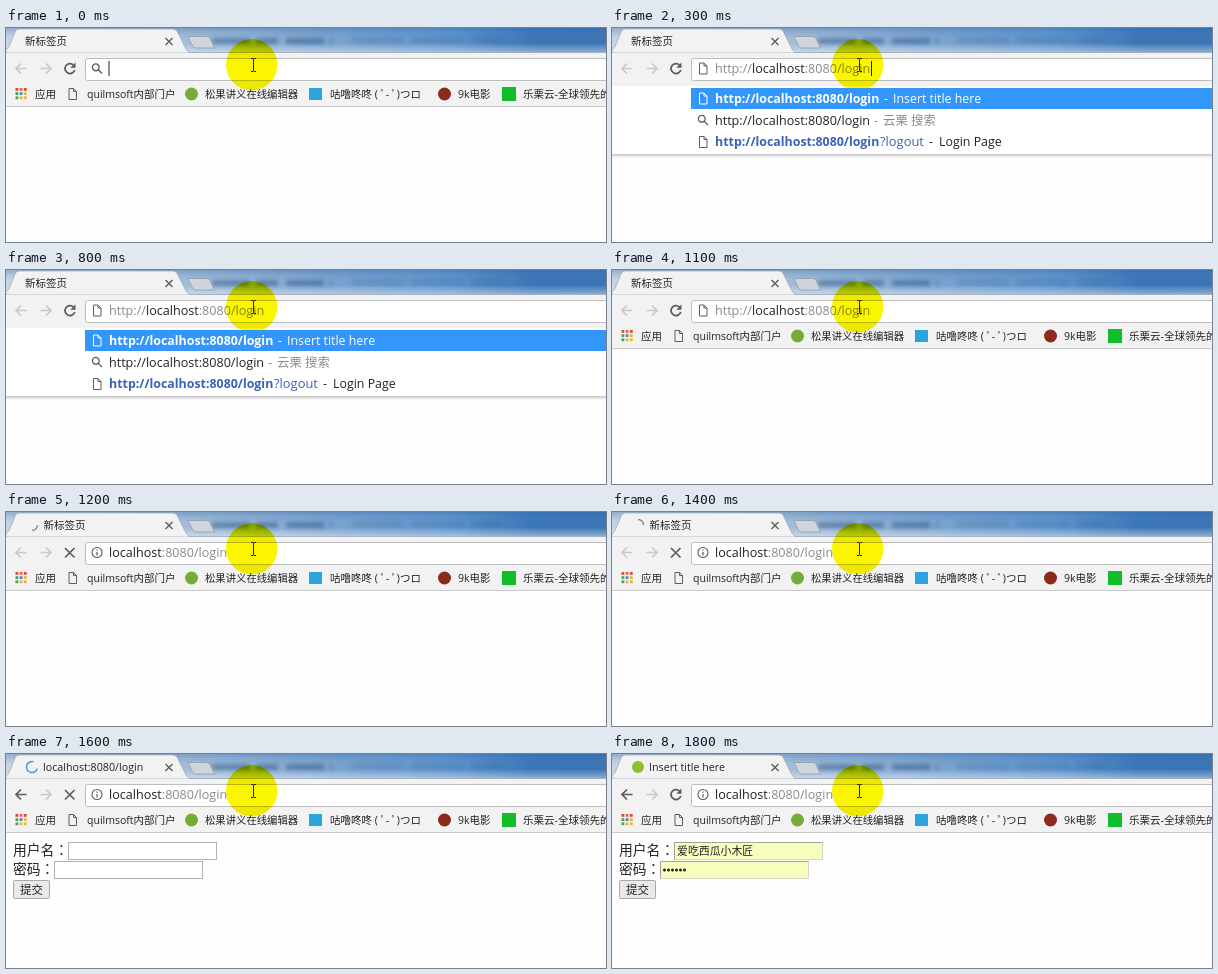
These frames come from a looping animation (600x214 px, 3.2 s). An HTML page:

```html
<!DOCTYPE html>
<html lang="zh-CN">
<head>
<meta charset="utf-8">
<title>Login page</title>
<style>
  html, body { margin: 0; width: 100%; height: 100%; overflow: hidden; background: #fefefe; }
  svg { display: block; font: 10.5px "Open Sans", "Noto Sans CJK SC", sans-serif; fill: #222; }
  text { white-space: pre; }
  .url { font-size: 12.6px; }
  .row { font-size: 12.4px; }
  .tab { font-size: 10.7px; }
  .page { font-size: 13.8px; }
  .colon { font-family: "Noto Sans CJK TC", sans-serif; }
  .dim { fill: #8a8a8a; }
  .link { fill: #3a62b8; }
  .bold { font-weight: 700; }
  .line { fill: none; stroke: #5c5c5c; stroke-width: 1.7; }
  .thin { stroke-width: 1; }
  .off { stroke: #c9c9c9; }
  .field { fill: #fff; stroke: #b2b2b2; }
  .filled { fill: #f8fdbe; stroke: #d5d8c4; }
  .inset { fill: none; stroke: #a2a49a; }
</style>
</head>
<body>
<svg width="600" height="214" viewBox="0 0 600 214">
  <defs>
    <linearGradient id="glass">
      <stop offset="0" stop-color="#c6d3e1"/>
      <stop offset=".34" stop-color="#9db8d6"/>
      <stop offset=".55" stop-color="#7aa2cf"/>
      <stop offset=".74" stop-color="#5f94cd"/>
      <stop offset=".88" stop-color="#3a75b7"/>
      <stop offset="1" stop-color="#3a74b4"/>
    </linearGradient>
    <linearGradient id="sheen" x2="0" y2="1">
      <stop offset="0" stop-color="#2f66a6" stop-opacity=".35"/>
      <stop offset=".4" stop-color="#5f94cd" stop-opacity="0"/>
      <stop offset=".6" stop-color="#fff" stop-opacity="0"/>
      <stop offset="1" stop-color="#fff" stop-opacity=".45"/>
    </linearGradient>
    <linearGradient id="shade" x2="0" y2="1">
      <stop offset="0" stop-color="#c4c4c4"/>
      <stop offset="1" stop-color="#fefefe"/>
    </linearGradient>
    <filter id="soft" filterUnits="userSpaceOnUse" x="180" y="0" width="420" height="25"><feGaussianBlur stdDeviation="2.2"/></filter>
    <path id="sheet" class="thin" d="M-3.5-5.5H1L4-2.5V5.5H-3.5ZM1-5.5V-2.5H4"/>
    <path id="lens" d="M1.6 1.6 5 5M2.2-1.2A3.4 3.4 0 1 1-4.6-1.2 3.4 3.4 0 1 1 2.2-1.2"/>
    <path id="arrow" d="M5.5 0H-5M0-5-5 0 0 5"/>
    <rect id="input" width="148" height="17"/>
    <path id="edge" d="M0 17V0H148"/>
  </defs>

  <!-- window frame and tab -->
  <rect width="600" height="25" fill="url(#glass)"/>
  <rect width="600" height="25" fill="url(#sheen)"/>
  <g filter="url(#soft)" fill="none" stroke="#2f5483" stroke-width="6">
    <path d="M206 13H326" stroke-dasharray="38 6 22 8" opacity=".5"/>
    <path d="M345 12H495" stroke-dasharray="52 8" opacity=".2"/>
  </g>
  <path d="M0 24.5H600" stroke="#a3b1c1"/>
  <path d="M0 25V22Q3 20 5 14L9 4Q10 1 13 1H167Q170 1 171.5 4L180 21Q181.500 24 185 25Z" fill="#f2f2f3" stroke="#98a4b2" stroke-width=".7"/>
  <path d="M182 8.500H201Q203 8.500 204 10.500L208.500 20H190Q187.500 20 186.500 18Z" fill="#cfd5dc" stroke="#8e9cad" stroke-width=".8"/>
  <path class="line" style="stroke-width:1.4" d="M159.500 10l7 7m0-7l-7 7"/>

  <text data-at="0-1200" x="19" y="16.500">新标签页</text>
  <text data-at="1200-1500" x="37.500" y="16.500">新标签页</text>
  <text data-at="1500-1700" class="tab" x="37" y="17">localhost:8080/login</text>
  <text data-at="1700-3200" class="tab" x="37" y="17">Insert title here</text>
  <path data-at="1200-1500" id="waiting" class="line" style="stroke:#8a8a8a;stroke-width:1.4" d="M0-5.500A5.500 5.500 0 0 1 5.500 0"/>
  <path data-at="1500-1700" id="loading" class="line" style="stroke:#5b8fe0;stroke-width:1.5" d="M0-5.500A5.500 5.500 0 1 1-5.500 0"/>
  <circle data-at="1700-3200" cx="26" cy="13" r="6" fill="#8fbf2f"/>

  <!-- toolbar -->
  <rect y="25" width="600" height="54" fill="#f2f2f3"/>
  <path d="M0 78.500H600" stroke="#c9c9c9"/>
  <path d="M601 30.500H81.500Q79.500 30.500 79.500 32.500V50.500Q79.500 52.500 81.500 52.500H601" fill="#fff" stroke="#bdbdbd"/>
  <use data-at="0-1500" href="#arrow" class="line off" x="15" y="40.500"/>
  <use data-at="1500-3200" href="#arrow" class="line" x="15" y="40.500"/>
  <use href="#arrow" class="line off" transform="translate(40 40.500) scale(-1 1)"/>
  <g data-at="0-1200 1700-3200">
    <path class="line" d="M67.500 37A5 5 0 1 0 68.800 42"/>
    <path d="M69.500 34.500V39.700H64.300Z" fill="#5c5c5c"/>
  </g>
  <path data-at="1200-1700" class="line" d="M59 36l9.500 9.500m0-9.500l-9.500 9.500"/>

  <use data-at="0-300" href="#lens" class="line" style="stroke-width:1.4" x="91" y="40.500"/>
  <use data-at="300-1200" href="#sheet" class="line" x="91" y="40.500"/>
  <g data-at="1200-3200">
    <circle class="line" style="stroke-width:1.1" cx="91" cy="40.500" r="5"/>
    <path class="line" style="stroke-width:1.2" d="M91 37.500v1.300m0 1.200v3.500"/>
  </g>
  <text data-at="300-1200" class="url dim" x="103" y="45">http://<tspan fill="#222">localhost</tspan>:8080/login</text>
  <text data-at="1200-3200" class="url dim" x="103" y="45"><tspan fill="#222">localhost</tspan>:8080/login</text>
  <path data-at="0-300" d="M103 33V48" stroke="#222"/>
  <path data-at="300-800" d="M259.500 33V48" stroke="#222"/>

  <!-- bookmarks -->
  <g id="apps"></g>
  <use href="#sheet" class="line" x="66.500" y="66"/>
  <circle cx="185.500" cy="66" r="6.500" fill="#74ad35"/>
  <rect x="303" y="60" width="13" height="12" fill="#2ba3dc"/>
  <circle cx="438.500" cy="66" r="6.500" fill="#8b2b1c"/>
  <rect x="496" y="59" width="14" height="14" fill="#12bd2c"/>
  <text x="29" y="70">应用</text>
  <text x="81" y="70">quilmsoft内部门户</text>
  <text x="199" y="70" font-size="10.350">松果讲义在线编辑器</text>
  <text x="324" y="70">咕噜咚咚 ( ﾟ- ﾟ)つロ</text>
  <text x="452" y="70">9k电影</text>
  <text x="517" y="70">乐栗云-全球领先的</text>

  <!-- login form -->
  <g data-at="1500-3200">
    <text class="page" x="7" y="101">用户名<tspan class="colon" lang="zh-TW">：</tspan></text>
    <text class="page" x="7" y="120">密码<tspan class="colon" lang="zh-TW">：</tspan></text>
    <use href="#input" class="field" x="62.500" y="88.500"/>
    <use href="#input" class="field" x="48.500" y="107.500"/>
    <g data-at="1800-3200">
      <use href="#input" class="filled" x="62.500" y="88.500"/>
      <use href="#edge" class="inset" x="62.500" y="88.500"/>
      <use href="#input" class="filled" x="48.500" y="107.500"/>
      <use href="#edge" class="inset" x="48.500" y="107.500"/>
      <text x="65" y="100.500" font-size="10.900">爱吃西瓜小木匠</text>
      <path d="M52.500 116H74" stroke="#222" stroke-width="3" stroke-linecap="round" stroke-dasharray="0 4"/>
    </g>
    <rect x="7.500" y="126.500" width="36" height="18" rx="1" fill="#e9e9e9" stroke="#a9a9a9"/>
    <text x="14" y="139.500" font-size="11.500">提交</text>
  </g>

  <!-- suggestions, pointer highlight -->
  <g data-at="300-1100">
    <rect y="58" width="600" height="68" fill="#fff"/>
    <rect y="126" width="600" height="4" fill="url(#shade)"/>
  </g>
  <circle cx="245.700" cy="36.800" r="25.700" fill="#fbf500" style="mix-blend-mode:multiply"/>
  <path class="line thin" style="stroke:#222" d="M245 30.500H247L247.500 31 248 30.500H250M247.500 31V43M245 43.500H247L247.500 43 248 43.500H250"/>
  <g data-at="300-1100" class="row">
    <rect x="79" y="60" width="521" height="21" fill="#3296fb"/>
    <use href="#sheet" class="line" style="stroke:#fff" x="91" y="70.500"/>
    <g fill="#fff">
      <text class="bold" x="103" y="75">http://localhost:8080/login</text>
      <text x="272" y="75">-</text>
      <text x="281" y="75">Insert title here</text>
    </g>
    <use href="#lens" class="line" style="stroke-width:1.3" x="91" y="92"/>
    <text class="url" x="103" y="97">http://localhost:8080/login</text>
    <text class="dim" x="262" y="97">-</text>
    <text class="dim" x="271" y="97">云栗 搜索</text>
    <use href="#sheet" class="line" x="91" y="114"/>
    <text class="link bold" x="103" y="118">http://localhost:8080/login</text>
    <text class="link" x="268" y="118" font-size="12.900">?logout</text>
    <text x="317" y="118">-</text>
    <text x="327" y="118">Login Page</text>
  </g>
</svg>
<script>
  const LOOP = 3200, STEP = 100;
  const byId = id => document.getElementById(id);

  const dotColors = ['#d9493a', '#e0693f', '#d9493a', '#4aa254', '#4b82d8', '#e5b43a', '#4aa254', '#e5b43a', '#e5b43a'];
  byId('apps').innerHTML = dotColors.map((color, i) =>
    `<rect x="${9.5 + i % 3 * 4.2}" y="${60 + Math.floor(i / 3) * 4.2}" width="2.8" height="2.8" fill="${color}"/>`).join('');

  const parts = [...document.querySelectorAll('[data-at]')].map(node => ({
    node,
    spans: node.dataset.at.split(' ').map(span => span.split('-').map(Number))
  }));
  const turn = (id, angle) => byId(id).setAttribute('transform', `translate(26 13) rotate(${angle})`);

  function draw(now) {
    const time = now % LOOP;
    for (const { node, spans } of parts) {
      const visible = spans.some(([from, to]) => time >= from && time < to);
      node.style.display = visible ? '' : 'none';
    }
    const step = Math.floor(time / STEP);
    turn('waiting', (14 - step) * 45);
    turn('loading', 45 + (step - 15) * 60);
  }

  const start = performance.now();
  function tick() {
    draw(performance.now() - start);
    requestAnimationFrame(tick);
  }
  tick();
</script>
</body>
</html>
```
